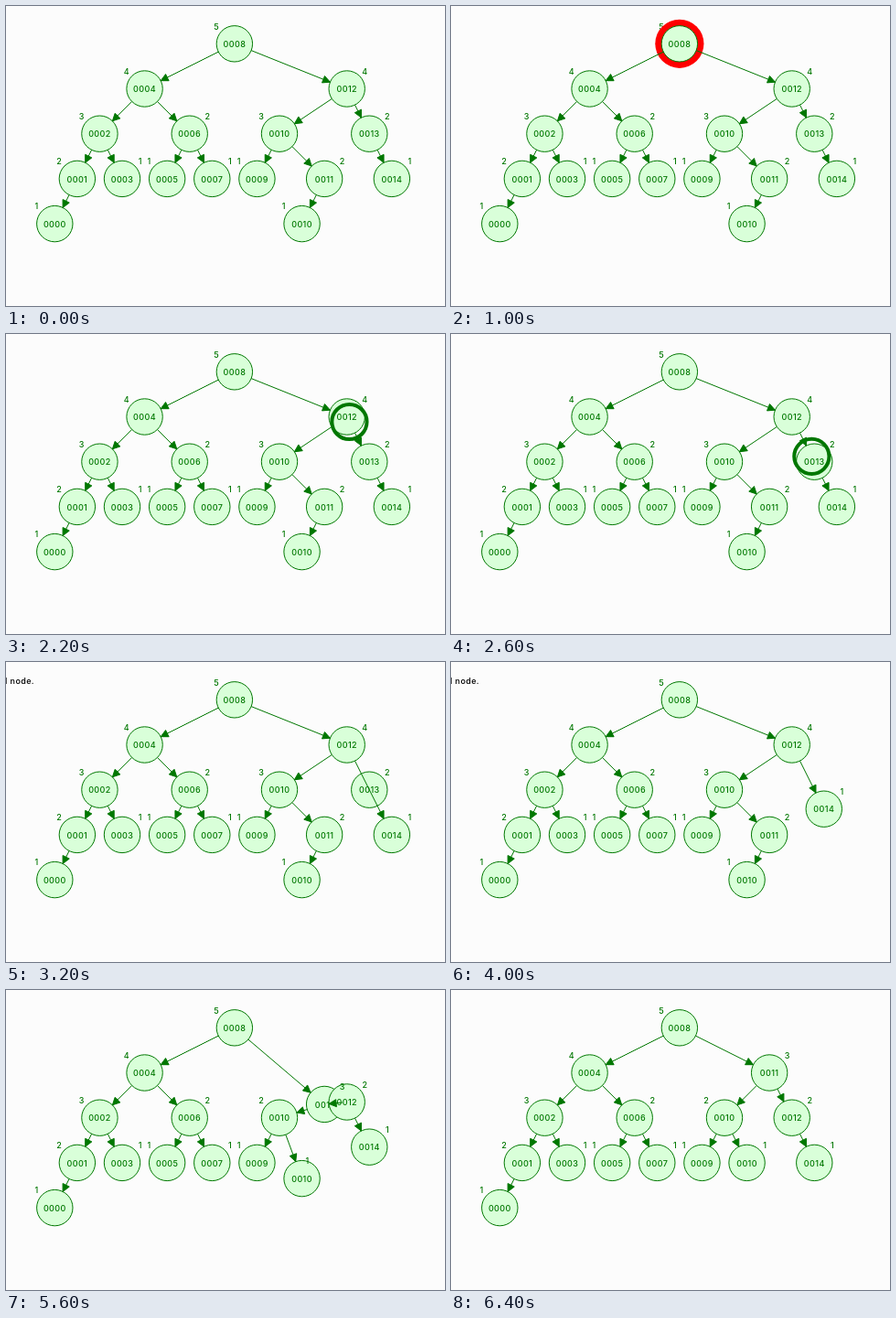
An HTML page with a canvas that plays this animation: 480 by 328 pixels, repeating every 6.93 s.

```html
<!DOCTYPE html>
<html lang="en">
<head>
<meta charset="utf-8">
<title>AVL tree deletion</title>
<style>
  html, body { margin: 0; width: 100%; height: 100%; overflow: hidden; background: #fcfcfc; }
  canvas { display: block; width: 480px; height: 328px; filter: blur(0.45px); }
</style>
</head>
<body>
<canvas id="stage"></canvas>
<script>
const LOOP = 6930, TICK = 200, BLOCK = 520;
const RADIUS = 19.7, GREEN = '#007700', RED = '#ff0000', FILL = '#d9ffd9';

// Start time of each animation block.
const START = {
  visit8: 610, to12: 1102, visit12: 1622, to13: 2142, visit13: 2662,
  relink: 3182, remove: 3702, unwind12: 4222, mark: 4742, rotate: 5262, unwind8: 5782
};

// Nodes in key order; the index is also the starting column.
const KEYS = [0, 1, 2, 3, 4, 5, 6, 7, 8, 9, 10, 10, 11, 12, 13, 14];
const DEPTHS = [4, 3, 2, 3, 1, 3, 2, 3, 0, 3, 2, 4, 3, 1, 2, 3];
const HEIGHTS = [1, 2, 3, 1, 4, 1, 2, 1, 5, 1, 3, 1, 2, 4, 2, 1];
const PARENTS = [1, 2, 4, 2, 8, 6, 4, 6, null, 10, 13, 12, 10, 8, 13, 14];
const RIGHT_LABELS = new Set([3, 6, 7, 12, 13, 14, 15]);
const N8 = 8, N10 = 10, N10B = 11, N11 = 12, N12 = 13, N13 = 14, N14 = 15;

const canvas = document.getElementById('stage');
const ctx = canvas.getContext('2d');
const ratio = window.devicePixelRatio || 1;
canvas.width = 480 * ratio;
canvas.height = 328 * ratio;

const mix = (a, b, p) => a + (b - a) * p;
const progress = (t, start) => Math.min(1, Math.max(0, (t - start) / BLOCK));
const during = (t, from, to) => t >= from && t < to;
const colX = col => 53.3 + 24.57 * col;
const rowY = depth => 41.3 + 49.2 * depth;

function treeAt(t) {
  const nodes = KEYS.map((key, i) => ({
    text: String(key).padStart(4, '0'),
    col: i, depth: DEPTHS[i], height: HEIGHTS[i], parent: PARENTS[i],
    side: RIGHT_LABELS.has(i) ? 1 : -1
  }));
  if (t >= START.relink) {
    nodes[N14].parent = N12;
    nodes[N13].parent = null;
  }
  if (t >= START.remove) {
    const p = progress(t, START.remove);
    nodes[N13].gone = true;
    nodes[N14].col = mix(15, 14, p);
    nodes[N14].depth = mix(3, 2, p);
  }
  nodes[N10].marked = nodes[N11].marked = during(t, START.mark, START.rotate);
  if (t >= START.rotate) {
    const p = progress(t, START.rotate);
    nodes[N10].height = nodes[N12].height = 2;
    nodes[N11].height = 3;
    nodes[N10].parent = nodes[N12].parent = N11;
    nodes[N11].parent = N8;
    nodes[N10B].parent = N10;
    nodes[N10B].depth = mix(4, 3, p);
    nodes[N10B].side = mix(-1, 1, p);
    nodes[N11].depth = mix(3, 1, p);
    nodes[N12].depth = mix(1, 2, p);
    nodes[N14].depth = mix(2, 3, p);
  }
  for (const n of nodes) {
    n.x = colX(n.col);
    n.y = rowY(n.depth);
  }
  return nodes;
}

function drawText(text, x, y, color = GREEN, align = 'center') {
  ctx.font = '500 9px Inter, sans-serif';
  ctx.letterSpacing = '0.4px';
  ctx.textAlign = align;
  ctx.textBaseline = 'alphabetic';
  ctx.fillStyle = color;
  ctx.fillText(text, x, y + 3.6);
}

function disc(x, y, r, fill) {
  ctx.beginPath();
  ctx.arc(x, y, r, 0, 2 * Math.PI);
  ctx.fillStyle = fill;
  ctx.fill();
}

function drawNode(n) {
  disc(n.x, n.y, RADIUS, FILL);
  ctx.strokeStyle = GREEN;
  ctx.lineWidth = 1;
  ctx.stroke();
  drawText(n.text, n.x, n.y);
}

function drawHalo(n, t) {
  const offPeak = Math.abs((t - 520) % 960 - 480);
  disc(n.x, n.y, RADIUS + 0.985 * (7 - offPeak / 120), RED);
  drawNode(n);
}

// Edges run between the rims, so an arrow turns round when two nodes overlap.
function drawEdge(from, to) {
  const dx = to.x - from.x, dy = to.y - from.y, length = Math.hypot(dx, dy);
  const flip = Math.sign(length - 2 * RADIUS);
  const ux = dx / length, uy = dy / length;
  const tipX = to.x - ux * RADIUS, tipY = to.y - uy * RADIUS;
  const baseX = tipX - flip * ux * 8, baseY = tipY - flip * uy * 8;
  ctx.strokeStyle = ctx.fillStyle = to.marked ? RED : GREEN;
  ctx.lineWidth = 1;
  ctx.beginPath();
  ctx.moveTo(from.x + ux * RADIUS, from.y + uy * RADIUS);
  ctx.lineTo(tipX, tipY);
  ctx.stroke();
  ctx.beginPath();
  ctx.moveTo(tipX, tipY);
  ctx.lineTo(baseX - uy * 4, baseY + ux * 4);
  ctx.lineTo(baseX + uy * 4, baseY - ux * 4);
  ctx.closePath();
  ctx.fill();
  ctx.stroke();
}

function drawRing(from, to, p) {
  ctx.beginPath();
  ctx.arc(mix(from.x, to.x, p), mix(from.y, to.y, p), RADIUS - 0.6, 0, 2 * Math.PI);
  ctx.strokeStyle = GREEN;
  ctx.lineWidth = 4;
  ctx.stroke();
}

function draw(t) {
  const nodes = treeAt(t);
  const shown = nodes.filter(n => !n.gone);
  ctx.setTransform(ratio, 0, 0, ratio, 0, 0);
  ctx.fillStyle = '#fcfcfc';
  ctx.fillRect(0, 0, 480, 328);

  shown.forEach(drawNode);
  for (const n of shown) drawText(n.height, n.x + n.side * 19.7, n.y - 19.3);
  if (during(t, START.relink, START.unwind12)) {
    drawText('right child of deleted node.', 31, 20, '#000', 'right');
  }

  const visits = [[N8, START.visit8, START.to12], [N12, START.visit12, START.to13],
                  [N13, START.visit13, START.relink]];
  for (const [i, from, to] of visits) {
    if (during(t, from, to)) drawHalo(nodes[i], t);
  }

  for (const n of shown) {
    if (n.parent !== null) drawEdge(nodes[n.parent], n);
  }

  const hops = [[N8, N12, START.to12], [N12, N13, START.to13],
                [N14, N12, START.unwind12], [N11, N8, START.unwind8]];
  for (const [a, b, start] of hops) {
    if (during(t, start, start + BLOCK)) drawRing(nodes[a], nodes[b], progress(t, start));
  }
}

const origin = performance.now();
function frame() {
  const t = (performance.now() - origin) % LOOP;
  draw(Math.min(Math.floor(t / TICK) * TICK, 6400));
  requestAnimationFrame(frame);
}
frame();
</script>
</body>
</html>
```
